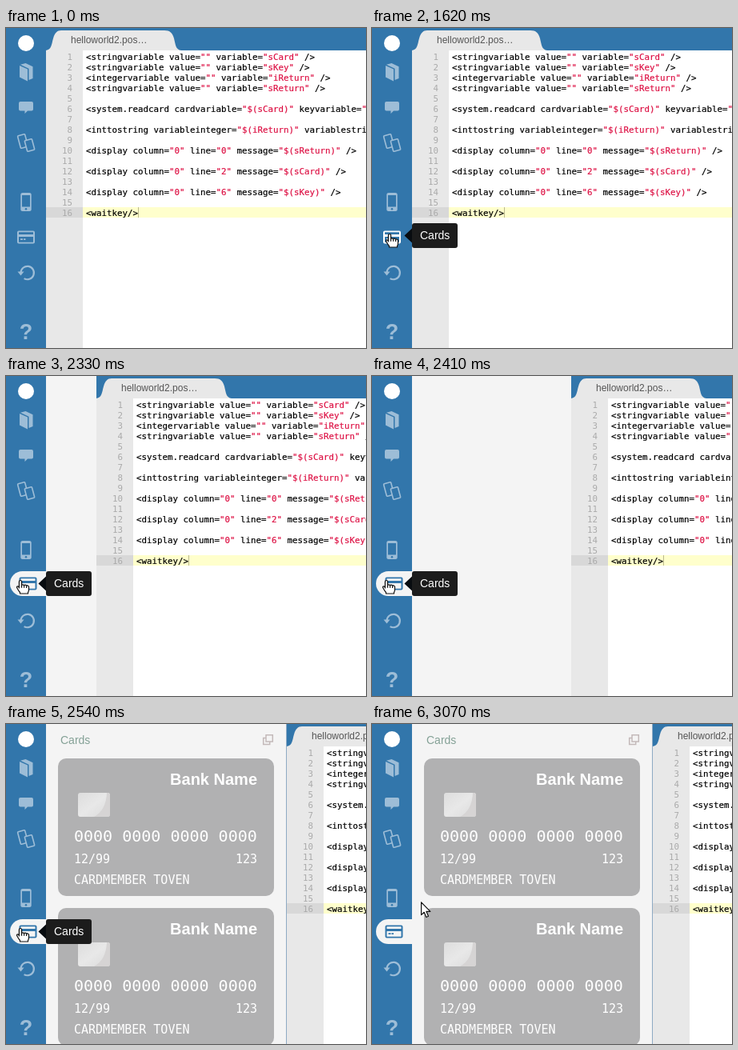
These frames come from a looping animation (450x400 px, 7880 ms). An HTML page:

```html
<!DOCTYPE html>
<html lang="en">
<head>
<meta charset="utf-8">
<title>Card panel</title>
<style>
  html, body { margin: 0; width: 100%; height: 100%; overflow: hidden; background: #fff; }
  svg { display: block; width: 450px; height: 400px; font-family: "Liberation Sans", Arial, sans-serif; }
  .code text { font: 10.8px "DejaVu Sans Mono", monospace; white-space: pre; stroke: #000; stroke-width: .2px; }
  .code .num { fill: #aaa; stroke: none; text-anchor: end; }
  .code .str { fill: #d14; stroke: #d14; }
  .face { fill: #fff; font-family: "DejaVu Sans Mono", monospace; font-size: 15px; }
  .face .bank { font: bold 20px "Liberation Sans", Arial, sans-serif; }
  .face .pan { font-size: 20px; }
  .end { text-anchor: end; }
</style>
</head>
<body>
<svg viewBox="0 0 450 400">
  <defs>
    <linearGradient id="chip" x2="1" y2="1">
      <stop offset="0" stop-color="#ddd"/>
      <stop offset=".5" stop-color="#e8e8e8"/>
      <stop offset="1" stop-color="#dadada"/>
    </linearGradient>
    <g id="face" class="face">
      <rect x="65" y="43" width="270" height="172" rx="10" fill="#b1b1b2"/>
      <text class="bank end" x="314" y="76">Bank Name</text>
      <rect x="90" y="86" width="40" height="30" rx="3" fill="url(#chip)"/>
      <path d="M126 86h1a3 3 0 0 1 3 3v24a3 3 0 0 1-3 3h-17q15-8 16-30z" fill="#d6d4d4"/>
      <text class="pan" x="85" y="147">0000 0000 0000 0000</text>
      <text x="85" y="174">12/99</text>
      <text class="end" x="314" y="174">123</text>
      <text x="85" y="200">CARDMEMBER TOVEN</text>
    </g>
  </defs>

  <g id="panel">
    <rect x="50" width="301" height="400" fill="#f4f4f4"/>
    <g id="cards">
      <text x="68" y="25" font-size="14" fill="#84a196">Cards</text>
      <g fill="none" stroke="#c3b9b9" stroke-width="1.5">
        <path d="M325 13.7h8.3v8.3h-8.3z"/>
        <path d="M325 17.5h-3.3v8h8v-3.5"/>
      </g>
      <use href="#face"/>
      <use href="#face" y="187"/>
      <path d="M350.5 0V400" stroke="#8eabc4"/>
    </g>
  </g>

  <g id="main">
    <rect x="50" width="400" height="400" fill="#fff"/>
    <rect x="50" width="400" height="28" fill="#3276ab"/>
    <rect x="50" y="28" width="46" height="372" fill="#e8e8e8"/>
    <path d="M50 28C57 27 57 20 59 13C61 6 64 3 69 3H198C205 3 208 6 210 13C212 21 212 27 219 28Z" fill="#e8e8e8"/>
    <text x="81" y="19" font-size="12" fill="#555">helloworld2.pos…</text>
    <rect x="50" y="224" width="46" height="13" fill="#d8d8d8"/>
    <rect x="96" y="224" width="354" height="13" fill="#ffc"/>
    <g id="code" class="code"></g>
    <path d="M165.5 224v13" stroke="#bbb98c"/>
  </g>

  <rect width="50" height="400" fill="#3276ab"/>
  <circle cx="25" cy="19" r="10" fill="#fff"/>
  <g fill="#9dbdd7">
    <path d="M17 47L27 51.5V66.500L17 61.500ZM18 45.800L24.500 44L33.500 48.200V63L28.500 65V50.700Z"/>
    <path d="M18 92h14a2 2 0 0 1 2 2v7.500a2 2 0 0 1-2 2h-5l-3.500 3.500v-3.500h-5.500a2 2 0 0 1-2-2v-7.500a2 2 0 0 1 2-2z"/>
    <g fill="#3276ab" stroke="#9dbdd7" stroke-width="1.6">
      <rect x="-4.700" y="-8" width="9.400" height="16" rx="1" transform="translate(21 141.500) rotate(-15)"/>
      <rect x="-4.700" y="-7" width="9.400" height="14" rx="1" transform="translate(29.500 146.500) rotate(-15)"/>
    </g>
    <rect x="18.300" y="206" width="13.400" height="23" rx="2.500"/>
    <path d="M20 209h10v14.500h-10z" fill="#3276ab"/>
    <circle cx="25" cy="226.300" r="1.300" fill="#3276ab"/>
    <path d="M18.500 306A8.200 8.200 0 1 1 22.600 313.100" fill="none" stroke="#9dbdd7" stroke-width="2.200"/>
    <path d="M14.500 304.500h8l-4 5z"/>
    <text x="25" y="388.500" font-size="27" font-weight="bold" text-anchor="middle">?</text>
  </g>
  <path id="pill" d="M50 244H20.500a15.500 15.500 0 0 0 0 31H50z" fill="#f4f4f4"/>
  <g id="cardIcon">
    <path d="M16 253.500h18a2 2 0 0 1 2 2v12a2 2 0 0 1-2 2H16a2 2 0 0 1-2-2V255.500a2 2 0 0 1 2-2zM16 255.300V258H34V255.300ZM16 261V267.700H34V261Z" fill-rule="evenodd"/>
    <path d="M18 263.300h3v1.700h-3zM22 263.300h2.500v1.700h-2.500z"/>
  </g>

  <g id="tip">
    <path d="M40.500 259.500L50 250.500V268.500z" fill="#080c10"/>
    <rect x="50" y="244" width="57" height="31" rx="3" fill="#1c1c1c"/>
    <text x="60" y="264" font-size="14" fill="#fff">Cards</text>
  </g>

  <g id="pointer" fill="#fff" stroke="#111" stroke-width="1.2" stroke-linejoin="round">
    <path id="arrow" d="M.6 .8V16.600L4.200 13.300L6.800 19.500L9.500 18.300L6.900 12.300H11.900Z"/>
    <g id="hand">
      <path d="M-1.600 10V2.100a1.600 1.600 0 0 1 3.200 0V6.300q1.600-1.200 3 .3q1.600-1 3 .6q1.800-.8 2.900 1V12q0 2-1 3.500V17H-.5V15.500Q-2 14-4.300 9.800q-.6-2 1-2q.9 .2 1.700 1.500Z"/>
      <path d="M1.600 6.300v3.500M4.600 6.600v3.200M7.600 7.200v2.800" fill="none"/>
    </g>
  </g>
</svg>
<script>
const LOOP = 7880;
const $ = id => document.getElementById(id);
const show = (id, on) => $(id).setAttribute('display', on ? 'inline' : 'none');
const clamp = v => Math.max(0, Math.min(1, v));
const swing = p => .5 - Math.cos(Math.PI * clamp(p)) / 2;

const lines = [
  '<stringvariable value="" variable="sCard" />',
  '<stringvariable value="" variable="sKey" />',
  '<integervariable value="" variable="iReturn" />',
  '<stringvariable value="" variable="sReturn" />', '',
  '<system.readcard cardvariable="$(sCard)" keyvariable="$(sKey)" />', '',
  '<inttostring variableinteger="$(iReturn)" variablestring="$(sReturn)" />', '',
  '<display column="0" line="0" message="$(sReturn)" />', '',
  '<display column="0" line="2" message="$(sCard)" />', '',
  '<display column="0" line="6" message="$(sKey)" />', '',
  '<waitkey/>'
];

function add(parent, tag, attrs, text) {
  const el = document.createElementNS('http://www.w3.org/2000/svg', tag);
  for (const k in attrs) el.setAttribute(k, attrs[k]);
  if (text) el.textContent = text;
  return parent.appendChild(el);
}

lines.forEach((line, i) => {
  const y = 40 + 13 * i;
  add($('code'), 'text', { x: 83, y, class: 'num' }, String(i + 1));
  const row = add($('code'), 'text', { x: 100, y });
  line.split(/("[^"]*")/).filter(Boolean).forEach(part =>
    add(row, 'tspan', part[0] === '"' ? { class: 'str' } : {}, part));
});

// Pointer path: time, x, y
const path = [
  [1300, 89, 264], [1380, 70, 263], [1460, 47, 261], [1540, 30, 259],
  [1620, 22, 257], [1740, 19, 258], [1940, 18, 255], [2540, 18, 255],
  [2660, 25, 251], [2780, 42, 239], [2860, 53, 229], [2980, 61, 221], [3070, 61, 222]
];

function pointerAt(t) {
  const i = path.findIndex(k => k[0] > t);
  if (i < 0) return path[path.length - 1].slice(1);
  const [a, b] = [path[i - 1], path[i]];
  const p = (t - a[0]) / (b[0] - a[0]);
  return [1, 2].map(n => Math.round(a[n] + (b[n] - a[n]) * p));
}

// The screen refreshes every 40 ms while something moves
function refresh(t) {
  const grid = (from, to) => Math.min(to, from + Math.floor((t - from) / 40) * 40);
  if (t < 1300) return 0;
  if (t < 1940) return grid(1300, 1740);
  if (t < 2250) return 1940;
  if (t < 2540) return grid(2250, 2490);
  if (t < 3070) return grid(2540, 2980);
  return 3070;
}

function draw(now) {
  const t = refresh(now % LOOP);
  const active = t >= 2250;
  const shift = Math.round(301 * swing((t - 2250) / 265));
  $('main').setAttribute('transform', `translate(${shift} 0)`);
  show('panel', active);
  show('cards', t >= 2540);

  show('pill', active);
  const hover = t >= 1460;
  $('cardIcon').setAttribute('fill', active ? '#3276ab' : hover ? '#fff' : '#9dbdd7');
  $('cardIcon').setAttribute('transform', active ? 'translate(2.5 -2)' : '');
  $('tip').setAttribute('opacity', clamp((t - 1460) / 150) * (1 - clamp((t - 2820) / 150)));

  show('pointer', t >= 1300);
  if (t >= 1300) {
    const [x, y] = pointerAt(t);
    const over = x < 50;
    $('pointer').setAttribute('transform', `translate(${x} ${y})`);
    show('hand', over);
    show('arrow', !over);
  }
}

const start = performance.now();
function tick() {
  draw(performance.now() - start);
  requestAnimationFrame(tick);
}
tick();
</script>
</body>
</html>
```
